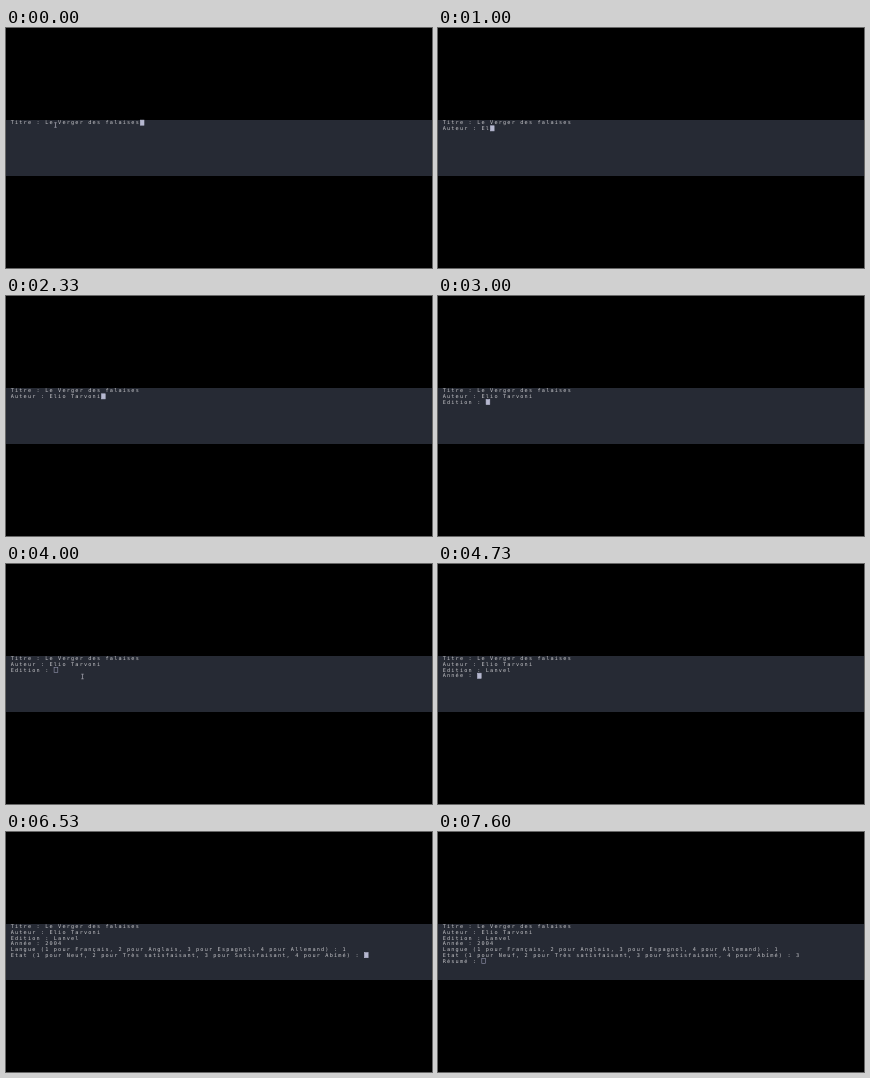
Animation, 426 px wide and 240 px high, one loop 8 s. Source, as an HTML page:

```html
<!DOCTYPE html>
<html lang="fr">
<head>
<meta charset="utf-8">
<title>Saisie d'un livre</title>
<style>
  html, body { margin: 0; width: 100%; height: 100%; overflow: hidden; background: #000; }
  svg { display: block; width: 100vw; height: 100vh; }
  text {
    font: 5.2px "DejaVu Sans Mono", monospace;
    letter-spacing: calc(4.31px - 1ch);
    text-rendering: geometricPrecision;
    white-space: pre;
    fill: #c4c4c8;
  }
  #cursor { fill: #b6b8d0; stroke: #b6b8d0; stroke-width: .6; }
  #cursor.hollow { fill: none; stroke: #9294ac; }
  #pointer { fill: none; stroke: #a8a8b4; stroke-width: .7; }
</style>
</head>
<body>
<svg viewBox="0 0 426 240">
  <rect width="426" height="240" fill="#000"/>
  <rect y="92" width="426" height="56" fill="#262a34"/>
  <g id="screen"></g>
  <rect id="cursor" width="3.7" height="5.1"/>
  <path id="pointer" d="M-1.2-2.3H1.2M0-2.3V2.3M-1.2 2.3H1.2"/>
</svg>
<script>
const LOOP = 8000, LEFT = 4.7, TOP = 91.8, COL = 4.31, ROW = 5.7;

// Each prompt appears at `from`; `keys` holds the time of every typed letter.
const prompts = [
  { from: 0, label: "Titre : Le Verger des falaises", answer: "", keys: [] },
  { from: 330, label: "Auteur : ", answer: "Elio Tarvoni",
    keys: [870, 1000, 1130, 1200, 1270, 1400, 1530, 1600, 1730, 1800, 2000, 2270] },
  { from: 2930, label: "Edition : ", answer: "Lanvel",
    keys: [4070, 4130, 4200, 4270, 4330, 4400] },
  { from: 4670, label: "Année : ", answer: "2004", keys: [4800, 4870, 4930, 5070] },
  { from: 5200, answer: "1", keys: [5530],
    label: "Langue (1 pour Français, 2 pour Anglais, 3 pour Espagnol, 4 pour Allemand) : " },
  { from: 5800, answer: "3", keys: [6600],
    label: "Etat (1 pour Neuf, 2 pour Très satisfaisant, 3 pour Satisfaisant, 4 pour Abîmé) : " },
  { from: 7400, label: "Résumé : ", answer: "", keys: [] }
];

const $ = id => document.getElementById(id);
const within = (t, from, to) => t >= from && t < to;

const lines = prompts.map((_, row) => {
  const line = document.createElementNS("http://www.w3.org/2000/svg", "text");
  line.setAttribute("x", LEFT);
  line.setAttribute("y", TOP + row * ROW + 4.5);
  line.setAttribute("xml:space", "preserve");
  return $("screen").appendChild(line);
});

function movePointer(t) {
  const early = t < 200, late = within(t, 3670, 4070);
  $("pointer").style.display = early || late ? "" : "none";
  const rest = Math.min(1, Math.max(0, (t - 3670) / 130));
  const [x, y] = early ? [49.5, 97] : [70 + 6.5 * rest, 110 + 2.5 * rest];
  $("pointer").setAttribute("transform", `translate(${x} ${y})`);
}

function draw(t) {
  let row = 0, col = 0;
  prompts.forEach(({ from, label, answer, keys }, i) => {
    const typed = keys.filter(time => time <= t).length;
    const shown = t >= from ? label + answer.slice(0, typed) : "";
    if (lines[i].textContent !== shown) lines[i].textContent = shown;
    if (shown) { row = i; col = shown.length; }
  });
  $("cursor").setAttribute("x", LEFT + col * COL + .3);
  $("cursor").setAttribute("y", TOP + row * ROW + .3);
  $("cursor").classList.toggle("hollow", within(t, 3400, 4070) || t >= 7600);
  movePointer(t);
}

const start = performance.now();
function tick() {
  draw((performance.now() - start) % LOOP);
  requestAnimationFrame(tick);
}
tick();
</script>
</body>
</html>
```
